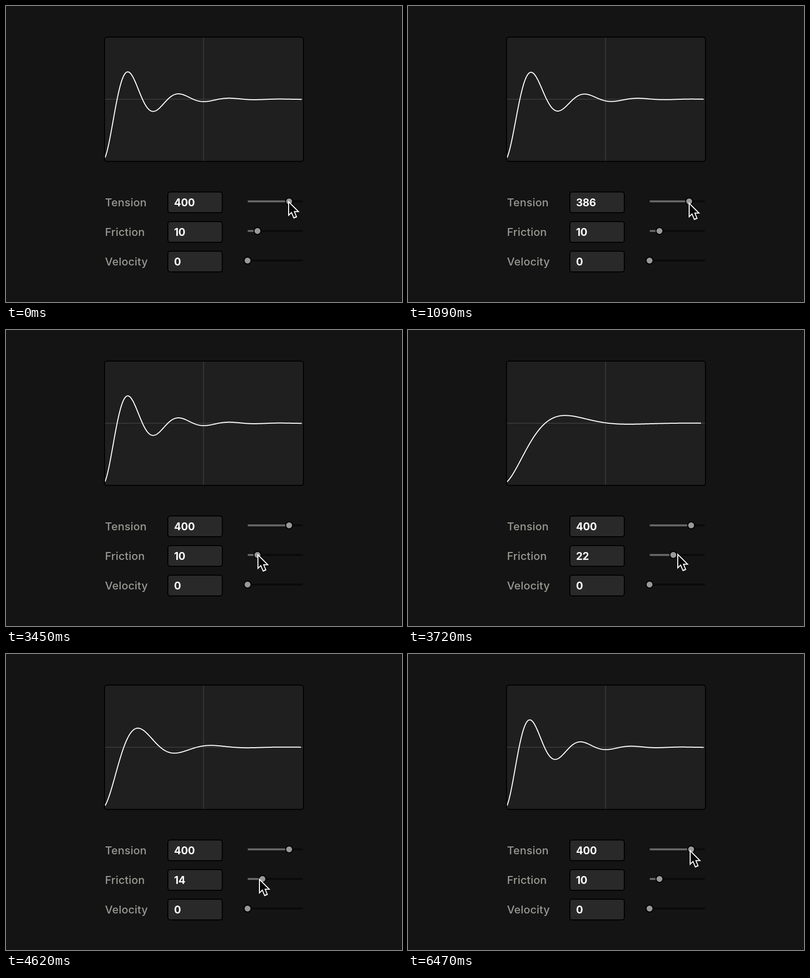
An HTML page for the animation above (6.5 s loop, 800 by 600 pixels).

```html
<!DOCTYPE html>
<html lang="en">
<head>
<meta charset="utf-8">
<title>Spring editor</title>
<style>
  html, body { margin: 0; width: 100%; height: 100%; overflow: hidden; background: #141414; }
  svg { display: block; width: 100vw; height: 100vh; }
  text { font-family: Inter, Roboto, sans-serif; }
  .label { font-size: 22px; font-weight: 500; letter-spacing: 0.2px; fill: #999993; }
  .value { font-size: 21px; font-weight: 700; letter-spacing: -0.2px; fill: #fff; }
  .box { stroke: #000; stroke-width: 2; }
</style>
</head>
<body>
<svg viewBox="0 0 800 600">
  <defs>
    <clipPath id="plot"><rect x="200" y="64" width="400" height="250" rx="4"/></clipPath>
  </defs>
  <rect width="800" height="600" fill="#141414"/>
  <rect class="box" x="199" y="63" width="402" height="252" rx="5" fill="#1f1f1f"/>
  <g clip-path="url(#plot)">
    <path d="M200 189H600M399 64V314" stroke="#363636" stroke-width="2"/>
    <path id="curve" fill="none" stroke="#fff" stroke-width="2" stroke-linejoin="round"/>
  </g>
  <g id="rows"></g>
  <g id="cursor">
    <g transform="scale(2) translate(-8.2 -5.15)">
      <path fill="#fff" d="M8.2 20.9V4.9L19.8 16.5H13L12.6 16.6ZM17.3 21.6L13.7 23.1L9 12L12.7 10.5Z"/>
      <rect x="12.5" y="13.6" width="2" height="8" transform="matrix(.9221 -.3871 .3871 .9221 -5.7605 6.5909)"/>
      <path d="M9.2 7.3V18.5L12.2 15.6L12.6 15.5H17.4Z"/>
    </g>
  </g>
</svg>
<script>
const LOOP = 6500, STEP = 30, LAG = 60;
const TRACK_X = 488, TRACK_W = 112;

const $ = id => document.getElementById(id);
const clamp = (v, lo, hi) => Math.min(hi, Math.max(lo, v));
const smooth = u => u * u * (3 - 2 * u);

// The pointer's path: each move goes on from where the last one ended.
const moves = [];
let last = { x: 570, y: 395 };
function move(start, end, x, y, power) {
  moves.push({ start, end, from: last, to: { x, y }, power });
  last = { x, y };
}
const drag = (start, end, x, y) => move(start, end, x, y, 0.8);
const hover = (start, end, x, y) => move(start, end, x, y, 0.44);

drag(0, 390, 516, 400);
drag(550, 1030, 567, 398);
drag(1420, 1570, 570, 398);
hover(1830, 1860, 569, 398);
hover(2190, 2790, 509, 453);
hover(2860, 3020, 507, 454);
drag(3420, 4050, 571, 452);
drag(4080, 4900, 497, 455);
drag(5060, 5270, 508, 455);
hover(5900, 6470, 569, 397);

function pointer(t) {
  const { start, end, from, to, power } = moves.filter(m => m.start <= t).pop();
  const elapsed = Math.floor((t - start) / STEP) * STEP;
  const u = clamp(elapsed / (end - start), 0, 1);
  const mix = (axis, p) => from[axis] + (to[axis] - from[axis]) * smooth(u ** p);
  // The vertical part runs slightly ahead, which bends the path.
  return { x: mix('x', power), y: mix('y', power * 0.77) };
}

function addRow(label, y) {
  const g = document.createElementNS('http://www.w3.org/2000/svg', 'g');
  g.setAttribute('transform', `translate(0 ${y})`);
  g.innerHTML = `
    <text class="label" x="200" y="10">${label}</text>
    <rect class="box" x="327" y="-19" width="110" height="42" rx="5" fill="#292929"/>
    <text class="value" x="339.5" y="10"></text>
    <rect x="${TRACK_X}" y="-2" width="${TRACK_W}" height="4" rx="2" fill="#0a0a0a"/>
    <rect class="fill" x="${TRACK_X}" y="-2" height="4" rx="2" fill="#666"/>
    <circle class="box" r="7" fill="#999"/>`;
  $('rows').append(g);
  const [value, fill, knob] = ['.value', '.fill', 'circle'].map(s => g.querySelector(s));
  return (number, offset) => {
    value.textContent = number;
    fill.setAttribute('width', offset);
    knob.setAttribute('cx', TRACK_X + offset);
  };
}

const setTension = addRow('Tension', 396);
const setFriction = addRow('Friction', 456);
addRow('Velocity', 516)(0, 0);

// Knobs snap to every second pixel; the shown value is a whole number.
function slide(set, x, min, max) {
  const offset = clamp(Math.round((x - TRACK_X) / 2) * 2, 0, TRACK_W);
  const value = Math.round(min + offset * (max - min) / TRACK_W);
  set(value, offset);
  return value;
}

// A damped spring, one step per 1/60 s, spread over the width until it settles.
function springPath(tension, friction) {
  const decay = friction / 2;
  const freq = Math.sqrt(Math.max(tension - decay * decay, 0.01));
  const steps = 76 * (10 / friction) ** 0.985 - 2.5 * clamp((400 - tension) / 14, 0, 1);
  const points = [];
  for (let s = 0; s <= steps - 0.5; s += 0.25) {
    const t = (s + 1) / 60;
    const off = Math.exp(-decay * t) * (Math.cos(freq * t) + decay / freq * Math.sin(freq * t));
    points.push([200 + s * 400 / steps, 189 + 125 * off]);
  }
  return 'M' + points.join('L');
}

function draw(t) {
  const { x, y } = pointer(t);
  $('cursor').setAttribute('transform', `translate(${Math.floor(x + 0.01)} ${Math.round(y)})`);

  // Each slider follows the pointer, a little late, only while it is held.
  const heldX = (from, to) => pointer(clamp(t - LAG, from, to)).x;
  const tension = slide(setTension, heldX(0, 1800) + 1.5, 100, 500);
  const friction = slide(setFriction, heldX(3300, 5400), 1, 50);
  $('curve').setAttribute('d', springPath(tension, friction));
}

const began = performance.now();
function tick() {
  draw((performance.now() - began) % LOOP);
  requestAnimationFrame(tick);
}
tick();
</script>
</body>
</html>
```
